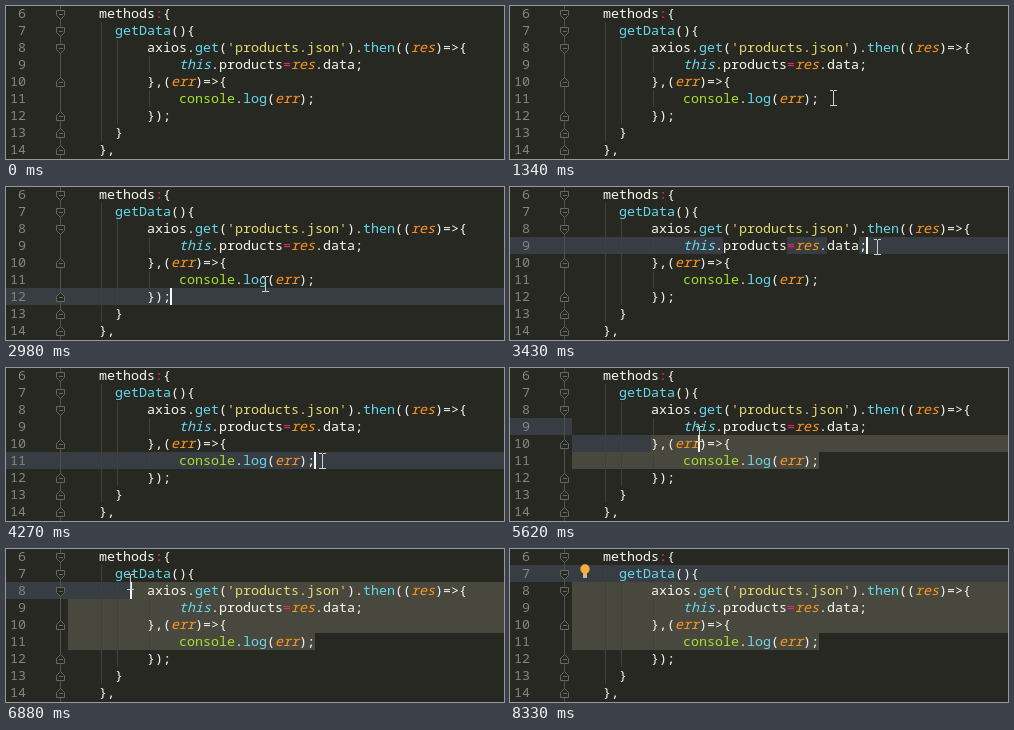
Recreate the animation shown at these times as an HTML page with a canvas. Size 498 by 153 pixels, loop 8.76 s.

```html
<!DOCTYPE html>
<html lang="en">
<head>
<meta charset="utf-8">
<style>
  html, body { margin: 0; overflow: hidden; background: #272822; }
  canvas { display: block; }
</style>
</head>
<body>
<canvas id="stage" width="498" height="153"></canvas>
<script>
const ctx = document.getElementById('stage').getContext('2d');
const LOOP = 8760, W = 498, H = 153, ROW = 17, CHAR = 8, LEFT = 93, EDITOR = 62;
const FONT = '13.333px "Noto Sans Mono", "DejaVu Sans Mono", monospace';
const BACK = '#272822', CURRENT = '#383c43', SELECTED = '#49483e', GUIDE = '#3f403a', FOLD = '#66675f';
const white = '#f8f8f2', cyan = '#66d9ef', pink = '#f92672',
      yellow = '#e6db74', green = '#a6e22e', orange = '#fd971f';

// Each line: indent in columns, then [colour, text, style] tokens
const lines = [
  [0, [white, 'methods'], [pink, ':'], [white, '{']],
  [2, [cyan, 'getData'], [white, '(){']],
  [6, [white, 'axios.'], [cyan, 'get'], [white, '('], [yellow, "'products.json'"],
      [white, ').'], [cyan, 'then'], [white, '(('], [orange, 'res', 'italic'], [white, ')=>{']],
  [10, [cyan, 'this', 'italic'], [white, '.'], [white, 'products', 'plate'], [pink, '='],
       [orange, 'res', 'italic'], [white, '.'], [white, 'data', 'plate'], [white, ';']],
  [6, [white, '},('], [orange, 'err', 'italic'], [white, ')=>{']],
  [10, [green, 'console'], [white, '.'], [cyan, 'log'], [white, '('],
       [orange, 'err', 'italic'], [white, ');']],
  [6, [white, '});']],
  [2, [white, '}']],
  [0, [white, '},']]
];
const folds = 'vvv ^ ^^^';
const indents = [0, 2, 6];
const ANCHOR = 5, DRAG = 4270, RELEASE = 7270, LEAVE = 7790, LAG = 130;

// Pointer key points: [time, x, y]
const path = [
  [400, 207, 144], [800, 352, 77], [1060, 323, 92], [2080, 323, 92], [2440, 276, 73],
  [2575, 262, 64], [2845, 226, 108], [3430, 367, 60], [DRAG, 316, 93], [5230, 222, 75],
  [5620, 189, 66], [6880, 124, 33], [RELEASE, 204, 25], [LEAVE, 204, 25], [8300, 404, 160]
];
const clicks = [[1650, ANCHOR], [2845, 6], [3430, 3]];

const rowTop = row => row * ROW - 1;
const rowAt = y => Math.floor((y + 1) / ROW);
const columnX = col => LEFT + CHAR * col;
const endOf = row => columnX(lines[row].slice(1).reduce((n, token) => n + token[1].length, lines[row][0]));

function pointerAt(t) {
  const i = path.findIndex(p => p[0] > t);
  if (i < 1) return null;
  const [a, b] = [path[i - 1], path[i]];
  const k = (t - a[0]) / (b[0] - a[0]);
  return [1, 2].map(j => Math.round(a[j] + (b[j] - a[j]) * k));
}

// While dragging, the text area trails the gutter slightly
function caretAt(t) {
  if (t < DRAG) {
    const click = clicks.filter(c => c[0] <= t).pop();
    return click && { row: click[1], gutterRow: click[1], x: endOf(click[1]) };
  }
  const [x, y] = pointerAt(Math.min(t, RELEASE));
  const row = rowAt(pointerAt(Math.min(Math.max(t - LAG, DRAG), RELEASE))[1]);
  const col = Math.round((x - LEFT) / CHAR);
  return { row, gutterRow: rowAt(y), x: Math.min(endOf(row), columnX(col)) };
}

function fill(colour, x, y, w, h) {
  ctx.fillStyle = colour;
  ctx.fillRect(x, y, w, h);
}

function drawCurrentRow({ row, gutterRow }) {
  fill(CURRENT, 0, rowTop(gutterRow), EDITOR, ROW);
  fill(CURRENT, EDITOR, rowTop(row), W - EDITOR, ROW);
}

function drawSelection({ row, x }) {
  for (let r = row; r <= ANCHOR && row < ANCHOR; r++) {
    const from = r > row ? EDITOR : x < endOf(r) ? Math.min(x, columnX(lines[r][0])) : W;
    const to = r < ANCHOR ? W : endOf(r);
    fill(SELECTED, from, rowTop(r), to - from, ROW);
  }
}

function drawFold(row, dir) {
  const y = rowTop(row) + 9;
  ctx.beginPath();
  for (const [dx, dy] of [[-4, -4], [4, -4], [4, 1], [0, 5], [-4, 1]])
    ctx.lineTo(54.5 + dx, y + 0.5 + dy * dir);
  ctx.closePath();
  ctx.fillStyle = BACK;
  ctx.fill();
  ctx.strokeStyle = FOLD;
  ctx.stroke();
  fill(FOLD, 53, y, 4, 1);
}

function drawLine([indent, ...tokens], row, isCurrent) {
  const top = rowTop(row), base = top + 13;
  for (const col of indents.filter(c => c < indent))
    fill(GUIDE, columnX(col) + 2, top, 1, ROW);
  if (folds[row] !== ' ') drawFold(row, folds[row] === 'v' ? 1 : -1);

  ctx.font = FONT;
  ctx.fillStyle = '#85867f';
  ctx.textAlign = 'right';
  ctx.fillText(row + 6, 20, base);
  ctx.textAlign = 'left';
  let x = columnX(indent);
  for (const [colour, text, style] of tokens) {
    const width = text.length * CHAR;
    if (style === 'plate' && isCurrent) fill(BACK, x, top, width, ROW);
    ctx.font = (style === 'italic' ? 'italic ' : '') + FONT;
    ctx.fillStyle = colour;
    ctx.fillText(text, x, base);
    x += width;
  }
}

function drawBulb(row) {
  const y = rowTop(row);
  ctx.fillStyle = '#f4af3d';
  ctx.beginPath();
  ctx.arc(75, y + 4, 4.7, 0, 7);
  ctx.fill();
  fill('#f4af3d', 73, y + 7, 4, 3);
  fill('#b9bab5', 73, y + 10, 4, 3);
}

function drawPointer([x, y]) {
  fill('#d0d0cc', x, y - 7, 1, 15);
  for (const dy of [-8, 7])
    for (const dx of [-3, 1]) fill('#d0d0cc', x + dx, y + dy, 3, 1);
}

function draw() {
  const t = performance.now() % LOOP;
  const caret = caretAt(t), pointer = pointerAt(t);
  fill(BACK, 0, 0, W, H);
  if (caret) drawCurrentRow(caret);
  if (t >= DRAG) drawSelection(caret);
  fill('#50514a', 54, 0, 1, H);
  lines.forEach((line, row) => drawLine(line, row, t < DRAG && caret?.row === row));
  if (caret && t < LEAVE) fill(white, caret.x - 1, rowTop(caret.row), 2, ROW);
  if (t >= 2080 && t < 2845 || t >= LEAVE) drawBulb(caret.row);
  if (pointer) drawPointer(pointer);
  requestAnimationFrame(draw);
}
draw();
</script>
</body>
</html>
```
